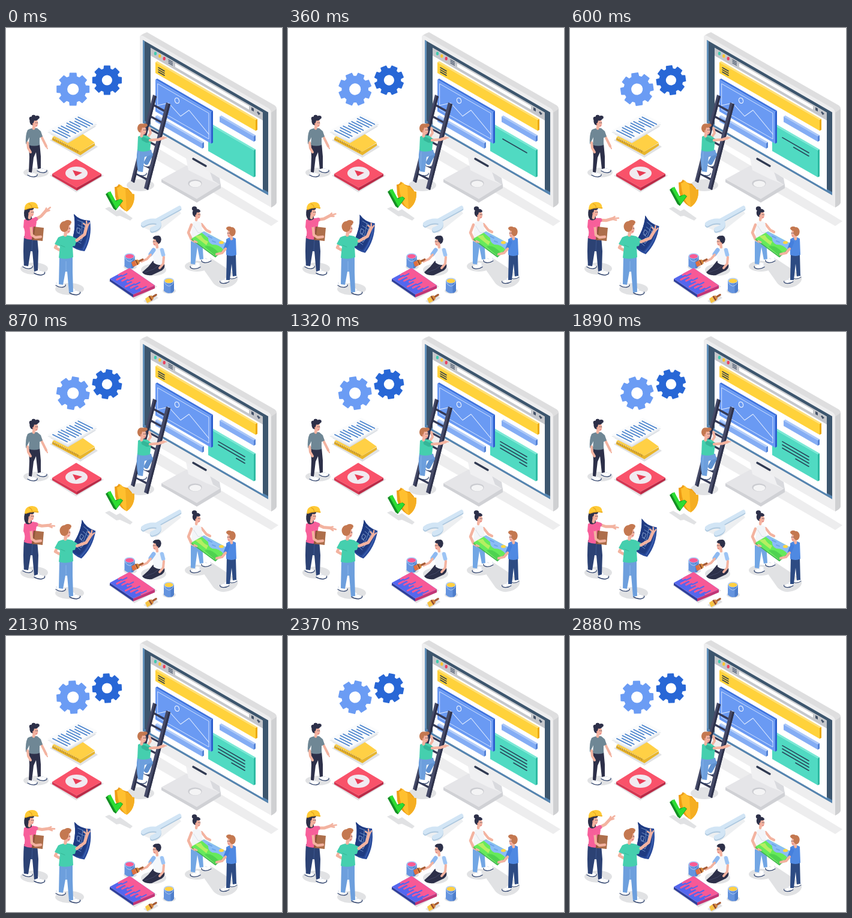
These frames come from a looping animation (460 px wide and 460 px high, 2910 ms). An HTML page with a canvas:

```html
<!DOCTYPE html>
<html lang="en">
<head>
<meta charset="utf-8">
<title>Website building scene</title>
<style>
html, body { margin: 0; width: 100%; height: 100%; overflow: hidden; background: #fff; }
canvas { display: block; width: 460px; height: 460px; }
</style>
</head>
<body>
<canvas id="stage"></canvas>
<script>
const LOOP = 2910, ISO = 0.577;
const SKIN = '#f3b3a0', DARK = '#2d3049', NAVY = '#2c4274', JEANS = '#6d9fdd',
      TEAL = '#45cfae', RUST = '#c47850', SHADE = '#e1e2e4', WHITE = '#fff';
const cv = document.getElementById('stage');
const g = cv.getContext('2d');
const dpr = window.devicePixelRatio || 1;
cv.width = cv.height = 460 * dpr;

function fill(color, d) {
  g.fillStyle = color;
  g.fill(new Path2D(d));
}
function line(color, w, d) {
  g.strokeStyle = color;
  g.lineWidth = w;
  g.lineCap = g.lineJoin = 'round';
  g.stroke(new Path2D(d));
}
function oval(color, x, y, rx, ry = rx, tilt = 0) {
  g.fillStyle = color;
  g.beginPath();
  g.ellipse(x, y, rx, ry, tilt, 0, 7);
  g.fill();
}
function at(x, y, draw, turn = 0, sx = 1, sy = 1) {
  g.save();
  g.translate(x, y);
  g.rotate(turn);
  g.scale(sx, sy);
  draw();
  g.restore();
}
// Upright plane that recedes along the screen
function wall(color, x, y, x2, h) {
  const y2 = y + (x2 - x) * ISO;
  fill(color, `M${x},${y}L${x2},${y2}V${y2 + h}L${x},${y + h}Z`);
}
function slab(x, y, x2, h, front, top, side) {
  const y2 = y + (x2 - x) * ISO;
  fill(top, `M${x},${y}l3,-1.7L${x2 + 3},${y2 - 1.7}L${x2},${y2}Z`);
  fill(side, `M${x2},${y2}l3,-1.7v${h}l-3,1.7Z`);
  wall(front, x, y, x2, h);
}
function shoe(x, y, dir = 1, s = 1) {
  at(x, y, () => {
    fill(WHITE, 'M0,-2L5,-3Q9,2 14,2Q17,5 11,7Q4,7 -1,4Z');
    line('#33466f', 1.3, 'M-1,4Q4,7.5 10,7Q16,6 15,3');
    line('#c9d3e4', 0.7, 'M0,-1V3M6,1L9,0');
  }, 0, dir * s, s);
}
function head(x, y, dir, hair, s = 1) {
  at(x, y, () => {
    line(SKIN, 5, 'M0,4L-1,11');
    oval(hair, -2, -2, 6, 7.5);
    oval(SKIN, 1.8, 2, 5, 6.8);
    fill(hair, 'M-7.5,-2A7.6,7.6 0 0 1 7,-5Q5,-2 0,-3L-1.5,3L-4,5Z');
    oval('#e99c8b', -1.5, 3, 1.4, 1.9);
    oval(DARK, 3, 1, 0.7);
    oval(DARK, 5.6, 1, 0.7);
    line('#d6596a', 0.8, 'M3,6H5');
  }, 0, dir * s, s);
}

function gear(x, y, r, hole, color, turn) {
  at(x, y, () => {
    const p = new Path2D();
    for (let i = 0; i < 8; i++) {
      for (const [o, k] of [[-0.27, 0.77], [-0.19, 0.97], [0.19, 0.97], [0.27, 0.77]]) {
        const a = i * Math.PI / 4 + o;
        p.lineTo(r * k * Math.cos(a), r * k * Math.sin(a));
      }
    }
    p.closePath();
    g.fillStyle = g.strokeStyle = color;
    g.lineWidth = 1.6;
    g.lineJoin = 'round';
    g.fill(p);
    g.stroke(p);
    oval(WHITE, 0, 0, hole);
  }, turn);
}

function monitor(t) {
  fill('#ededee', 'M246,196L454,322L442,330L246,217Z');
  // Stand
  fill('#d0d1d5', 'M259,252L318,284L358,260V267L318,291L259,257Z');
  fill('#e5e5e8', 'M259,252L301,229L358,260L318,285Z');
  fill('#f0f0f2', 'M299,212L345,238L357,261L334,252L304,237Z');
  fill('#d9dade', 'M340,240L356,250L358,262L345,254Z');
  oval('#cbccd1', 315, 259, 11.5, 6.6);
  oval('#f4f4f5', 315.5, 260, 10, 5.3);
  // Case
  fill('#dededf', 'M223,15Q224,11 235,7L448,129Q452,132 451,138V291Q450,295 442,299L436,140Z');
  fill('#cfd0d2', 'M442,141L451,135V291Q450,295 442,299Z');
  fill('#eeeeef', 'M223,17Q222,11 228,13L438,134Q442,137 442,142V299L223,173Z');
  wall('#3d566e', 228, 20, 437, 138);
  wall('#608fba', 228, 20, 231, 138);
  wall('#5585b1', 228, 153, 437, 5);
  // Window
  wall(WHITE, 241, 33, 428, 129);
  wall('#c5c7cb', 241, 33, 428, 13);
  wall(WHITE, 282, 59, 405, 6);
  oval('#42cbb0', 249, 42.5, 2.2, 2.9);
  oval('#ffc72f', 256.3, 46.7, 2.2, 2.9);
  oval('#ed425e', 263.7, 51, 2.2, 2.9);
  for (let i = 0; i < 3; i++) line('#46546a', 1.2, `M271,${53 + i * 2.6}l6.5,3.8`);
  wall('#46546a', 409, 132, 413, 5);
  fill('#46546a', 'M418,140L420,139L424,143L421,145Z');
  slab(249, 57, 416, 18, '#ffd23b', '#ffe078', '#eba900');
  for (let i = 0; i < 3; i++) line('#38434c', 1.6, `M254,${66 + i * 3.6}l10,5.8`);
  slab(356, 147.5, 413, 9, '#84adf4', '#abc8f8', '#5583d6');
  slab(337, 160, 413, 45, '#50dac2', '#7ae8d5', '#2db9a2');
  slab(249, 147, 327, 9, '#84adf4', '#b4cefa', '#5583d6');
  slab(249, 86, 342, 53, '#6a9af3', '#3f74de', '#2c5ecd');
  line('#cfe0ff', 1, 'M253,93L338,142V185L253,136Z');
  g.strokeStyle = '#edf4ff';
  g.lineWidth = 1.2;
  g.beginPath();
  g.ellipse(285, 121, 3.5, 4.6, -0.35, 0, 7);
  g.stroke();
  line('#e0ebff', 1.1, 'M253,129L271,125L291,147L305,137L338,177');
  line('#303a52', 3.4, 'M312,218L333,230');
  textLines(t);
}

// Text rows grow from their right end, one after another
function textLines(t) {
  [44, 44, 44, 22].forEach((len, i) => {
    const k = Math.min(1, Math.max(0, (t - 20 - i * 365) / 375));
    if (!k) return;
    const y = 208 + i * 5.4;
    line('#29495c', 1.7, `M398,${y}L${398 - len * k},${y - len * k * ISO}`);
  });
}

function papers() {
  fill(SHADE, 'M73,187L110,167L153,198L124,216Z');
  fill('#e8b52c', 'M77,183L124,206L148,192V196L124,212L77,187Z');
  fill('#ffd045', 'M77,182L110,164L148,191L124,206Z');
  for (let i = 0; i < 15; i++) line('#a9791f', 0.9, `M${79 + i * 2.9},${183 + i * 1.5}v3`);
  fill('#d9dde3', 'M74,177L124,152L150,164L103,192Z');
  fill('#eaedf0', 'M69,174L122,146L152,161L103,190Z');
  fill('#fafbfc', 'M69,171L122,143L152,158L103,187Z');
  for (let i = 0; i < 10; i++) {
    const x = 78 + i * 4.7, y = 171 - i * 2.5;
    const a = i % 3 === 1 ? 4 : 0, n = i % 4 === 2 ? 17 : 24;
    line('#4580cc', 1.7, `M${x + a},${y + a / 2}L${x + n},${y + n / 2}`);
  }
}

function videoBox() {
  fill(SHADE, 'M73,246L116,222L163,246L117,274Z');
  fill('#d43652', 'M77,243L118,266V271L77,247Z');
  fill('#b92a46', 'M159,243L118,266V271L159,247Z');
  fill('#f9526a', 'M77,243L117,218L159,243L118,266Z');
  oval('#f1eaf0', 117.5, 242, 18.5, 11);
  fill('#e73c55', 'M111,237L127,241L116,247Z');
}

function manGrey() {
  oval(SHADE, 50, 241, 21, 8);
  shoe(37, 241);
  shoe(53, 234);
  line(SKIN, 4, 'M56,174L61,185L67,197');
  line(SKIN, 2, 'M67,197L69,201');
  fill(DARK, 'M38,192H56L58,214L58,234L53,235L50,207L46,216L43,241L38,240L39,215Z');
  fill('#6f8795', 'M36,170Q43,166 52,167L58,172L61,181L56,183L56,195Q47,198 38,195L39,182L33,194Q32,178 36,170Z');
  line(SKIN, 4, 'M36,191L37,200L41,207');
  head(47, 157, 1, DARK, 0.95);
  oval(DARK, 42, 151, 3.3);
  oval(DARK, 46, 148, 3.3);
  oval(DARK, 52, 149, 3.8, 3);
}

function climber() {
  line(SKIN, 4, 'M235,184L241,175L239,167');
  shoe(229, 226, 1, 0.75);
  line('#5f91d0', 8, 'M234,204L241,211L234,224');
  shoe(219, 239);
  fill(JEANS, 'M219,202L242,203L244,211L231,215L228,240L220,239Q216,220 219,202Z');
  line('#86b1e6', 1, 'M222,207L221,235');
  fill(TEAL, 'M220,181Q227,177 236,180L242,185L240,204Q228,208 219,204Z');
  line('#35b698', 6.5, 'M229,185L235,188L240,187');
  line(SKIN, 4.5, 'M240,187L254,186L263,183');
  line(SKIN, 2, 'M262,183L267,183');
  head(227, 169, 1, RUST);
  oval(RUST, 232, 162, 3.8, 2.8);
}

function ladder() {
  oval(SHADE, 224, 262, 23, 10);
  for (let i = 0; i < 7; i++) {
    const k = 0.1 + i * 0.133;
    line('#353a56', 3.4, `M${211 + 37 * k},${256 - 143 * k}L${234 + 36 * k},${268 - 143 * k}`);
  }
  fill('#464b68', 'M208,255L214,258L251,114L245,111Z');
  fill('#2e324b', 'M211,257L214,258L251,114L248,112.5Z');
  fill('#464b68', 'M230,267L237,270L274,127L267,124Z');
  fill('#2e324b', 'M234,269L237,270L274,127L271,126Z');
}

function shield(t) {
  fill(SHADE, 'M165,301L172,298L184,305L190,302L211,317L207,321L190,313L184,314Z');
  const lift = 4 * (1 - Math.cos(t / LOOP * 4 * Math.PI));
  at(0, -lift, () => {
    fill('#ee9d16', 'M181,265Q186,265 188,260Q196,267 203,267L210,275L207,299L199,305Q185,296 182,281Z');
    fill('#ffc02f', 'M185,266Q189,266 191,261Q197,269 204,270Q207,277 214,277Q215,297 201,306Q187,295 185,266Z');
    fill('#f5ae22', 'M199,268L204,270Q207,277 214,277Q215,297 201,306Z');
    fill('#148f24', 'M166,277L171,273L181,288L191,285L195,288L183,304L179,301Z');
    fill('#2cdd32', 'M169,275L174,272L183,289L190,285L194,288L184,302Z');
  });
}

function wrench() {
  fill('#edeff1', 'M228,332L250,342L262,333L292,309L288,304Z');
  for (const [color, y] of [['#adc8df', 1.5], ['#d2e5f5', -0.5]]) {
    at(0, y, () => {
      line(color, 6.5, 'M251,321L289,300');
      line(color, 8, 'M253,323Q240,320 229,327M254,323Q258,332 244,336');
    });
  }
}

function womanPointing(t) {
  const k = Math.sin(t / LOOP * Math.PI);
  oval(SHADE, 47, 401, 23, 10);
  at(47, 320, () => {
    line(SKIN, 5, 'M0,0L13,2L24,0');
    line(SKIN, 2.6, 'M23,0L34,0M24,1L30,3M24,-1L28,-3');
    line('#f3639c', 7, 'M-2,0L3,0.5');
  }, (-38 + 54 * k) * Math.PI / 180);
  shoe(29, 394);
  shoe(48, 404, 1, 1.1);
  fill(NAVY, 'M30,347L52,348L54,372L53,404L47,406L44,372L41,372L37,397L30,396Q28,372 30,347Z');
  line('#3d578f', 1, 'M44,353L43,372');
  fill('#f75f9a', 'M30,320Q37,315 46,317L51,323L49,336L51,351Q40,355 30,350Q33,338 29,332Z');
  fill('#ad6e4b', 'M46,331L63,333L61,355L43,353Z');
  fill('#8f553b', 'M46,331L49,331L46,354L43,353Z');
  line(SKIN, 4.3, 'M41,326L43,345L49,349L58,348');
  line('#f75f9a', 6, 'M40,323L41,329');
  at(42, 314, () => {
    fill(DARK, 'M-11,-12Q-14,0 -8,6Q-3,8 1,4L0,-10Z');
    head(-2, -8, 1, DARK, 0.95);
    fill('#ffca36', 'M-11,-11Q-12,-23 1,-24Q10,-24 11,-16Q13,-14 11,-13Q2,-16 -11,-11Z');
    line('#e6a51e', 1.2, 'M-4,-21Q1,-19 1,-15M-10,-11Q1,-16 11,-14');
  }, k * 0.04);
}

function ease(v) {
  const c = Math.min(1, Math.max(0, v));
  return (1 - Math.cos(Math.PI * c)) / 2;
}

function manBlueprint(t) {
  const k = ease(t / 750) - ease((t - 1500) / 750);
  const turn = k * 0.3;
  oval(SHADE, 106, 435, 24, 10);
  at(110, 357, () => {
    fill('#28499a', 'M3,-47Q13,-36 30,-36Q34,-8 21,15Q7,14 -3,5Q8,-22 3,-47Z');
    fill('#1f3b82', 'M3,-47Q13,-36 25,-36Q29,-10 16,11Q5,10 -3,5Q8,-22 3,-47Z');
    line('#7da0d2', 0.8, 'M9,-37L23,-31M10,-29L23,-23M8,-16L20,-11M4,-4L15,2M17,-34L16,-14M22,-30L17,-6');
    line('#a9c2e6', 0.7, 'M9,-24L14,-22L12,-15L8,-18ZM14,-11L18,-9L15,-2L10,-5Z');
    line('#4a70ba', 1, 'M28,-33Q30,-9 19,12');
  }, turn);
  shoe(84, 425);
  shoe(107, 437, 1, 1.1);
  fill(JEANS, 'M89,381L111,382L111,407L112,440L105,441L102,406L99,406L95,428L88,427Z');
  line('#8bb5e8', 1, 'M100,389V405');
  line(SKIN, 4.6, 'M87,357L82,366L91,371');
  fill(TEAL, 'M87,349Q98,343 110,347L118,352L115,363L111,364L112,382Q100,387 88,383L90,364L81,360Z');
  line('#37b797', 1, 'M91,362L98,365');
  at(110, 357, () => {
    line(TEAL, 8, 'M-1,-1L5,-3');
    line(SKIN, 5, 'M8,-3L21,-13L25,-28');
    line(SKIN, 2.3, 'M24,-28L19,-31M25,-29L24,-35M26,-27L29,-32');
  }, turn);
  head(100, 333, 1, RUST, 1.1);
  oval(RUST, 97, 331, 7.5, 9);
  oval(RUST, 103, 324, 6, 4);
}

function bucket(x, y, paint, rim) {
  fill('#6594df', `M${x - 8.5},${y}V${y + 17}Q${x},${y + 25} ${x + 8.5},${y + 17}V${y}Z`);
  fill('#4e7ecb', `M${x + 3},${y}V${y + 21}Q${x + 7},${y + 20} ${x + 8.5},${y + 17}V${y}Z`);
  oval(rim, x, y, 8.5, 4.6);
  oval(paint, x, y + 0.5, 7, 3.5);
  line('#c5daf7', 0.8, `M${x - 8},${y + 3}Q${x},${y + 16} ${x + 8},${y + 3}`);
}

function brush(x, y, turn, tip) {
  at(x, y, () => {
    line('#a65c35', 3.2, 'M4,0L12,0');
    fill('#d78a3e', 'M-1,-4.5L5,-3.5V3.5L-1,4.5Z');
    fill('#8c482c', 'M0,-4.5L2,-4.5V4.5L0,4.5Z');
    fill(tip, 'M-7,-4L-1,-4.5V4.5L-8,4Z');
  }, turn);
}

function painter() {
  fill(SHADE, 'M171,422L207,403L252,431L214,452Z');
  oval(SHADE, 246, 403, 21, 10);
  oval(SHADE, 207, 398, 11, 5);
  bucket(206, 380, '#f85b94', '#a9c8f5');
  fill('#2f3f9c', 'M173,418L212,444V449L173,422Z');
  fill('#c23576', 'M248,429L212,444V449L248,434Z');
  fill('#5567ee', 'M173,418L206,400L248,429L212,444Z');
  fill('#f75996', 'M189,409L206,400L248,429L230,436.5Z');
  for (let i = 0; i < 8; i++) {
    const x = 191 + i * 5.4, y = 410 + i * 3.6, n = 3 + (i * 5 % 7) * 1.7;
    line('#f75996', 3, `M${x},${y}l${-n},${n / 2}`);
    if (i % 2) line('#5567ee', 2, `M${x - 3},${y}l8,-4`);
  }
  // Kneeling figure
  fill(DARK, 'M245,388L263,391Q267,399 260,404L243,412Q230,413 227,407L237,398Z');
  line('#424766', 1, 'M232,407L246,402L254,396');
  fill('#f4f7fb', 'M244,369Q250,364 260,367L266,377L263,394Q253,397 246,391Z');
  line('#8db9f1', 7, 'M246,370L241,377');
  line(SKIN, 4, 'M241,378L235,385L226,389');
  line('#9cc4f4', 6.5, 'M260,370L262,378');
  line(SKIN, 4, 'M263,382L262,393L256,400');
  head(251, 355, -1, DARK, 0.93);
  oval(DARK, 254, 352, 4.5, 6);
  brush(217, 391, -0.45, '#e0703f');
  // Spare tools
  oval(SHADE, 272, 438, 11, 5);
  bucket(271.5, 421, '#ffd043', '#b4cff7');
  fill(SHADE, 'M229,455L248,444L254,450L237,460Z');
  brush(240, 451, -0.55, '#f7c444');
}

function pairWithPicture() {
  oval(SHADE, 318, 397, 20, 9);
  fill(SHADE, 'M322,392Q332,381 344,385L385,412Q390,422 376,430Q358,438 346,426Z');
  // Woman
  shoe(323, 394, -1, 1.05);
  shoe(341, 384, -1);
  line(SKIN, 4.3, 'M326,327L334,337L340,340');
  fill('#72a6e4', 'M308,351L327,352L329,385L323,386L319,365L315,394L308,393Z');
  fill('#f3f5f8', 'M311,324Q318,320 325,324L328,339L327,356Q317,359 308,355Z');
  line('#d8dfe7', 1, 'M313,330L320,341L327,341');
  line(SKIN, 4.6, 'M309,328L304,341L309,352L315,356');
  head(318, 310, 1, DARK, 0.9);
  oval(DARK, 314, 301, 4.2, 3.7);
  // Boy
  shoe(371, 419, -1, 0.95);
  shoe(384, 412, -1, 0.85);
  fill('#2d4b83', 'M368,374L383,376L384,413L378,414L376,393L373,420L367,420Z');
  fill('#4f89e2', 'M367,352Q375,346 383,351L384,378Q376,382 367,378Z');
  // Picture
  fill('#3fb94a', 'M309,351L349,380L371,361V363L349,382.5L309,353Z');
  fill('#66ea5a', 'M309,351L330,339L371,361L349,380Z');
  fill('#8abdf6', 'M326,341L330,339L371,361L362,369Q354,360 344,361Q336,357 337,350Z');
  fill('#b5ee62', 'M315,347L325,345Q329,353 337,356L334,362Z');
  fill('#4fd250', 'M331,364Q342,360 355,375L349,380Z');
  oval('#ffd743', 359, 357.5, 4, 2.5);
  line('#6fa6e8', 2, 'M337,347L343,350M344,355L349,357');
  line('#457fdd', 6.5, 'M370,357L366,367');
  line(SKIN, 4.3, 'M366,368L360,375L351,377');
  line(SKIN, 3, 'M314,355L318,357');
  head(375, 341, -1, RUST, 0.94);
  oval(RUST, 377.5, 340, 5, 7);
  oval(RUST, 372, 334, 5, 3.3);
}

function draw(t) {
  g.setTransform(dpr, 0, 0, dpr, 0, 0);
  g.fillStyle = WHITE;
  g.fillRect(0, 0, 460, 460);
  const spin = t / LOOP * Math.PI;
  gear(111.7, 102, 28, 9.6, '#6b9cf4', spin);
  gear(168.4, 87, 25, 8.6, '#2867d6', spin);
  monitor(t);
  ladder();
  climber();
  papers();
  videoBox();
  manGrey();
  shield(t);
  wrench();
  womanPointing(t);
  manBlueprint(t);
  painter();
  pairWithPicture();
}

const start = performance.now();
function tick() {
  draw((performance.now() - start) % LOOP);
  requestAnimationFrame(tick);
}
tick();
</script>
</body>
</html>
```
